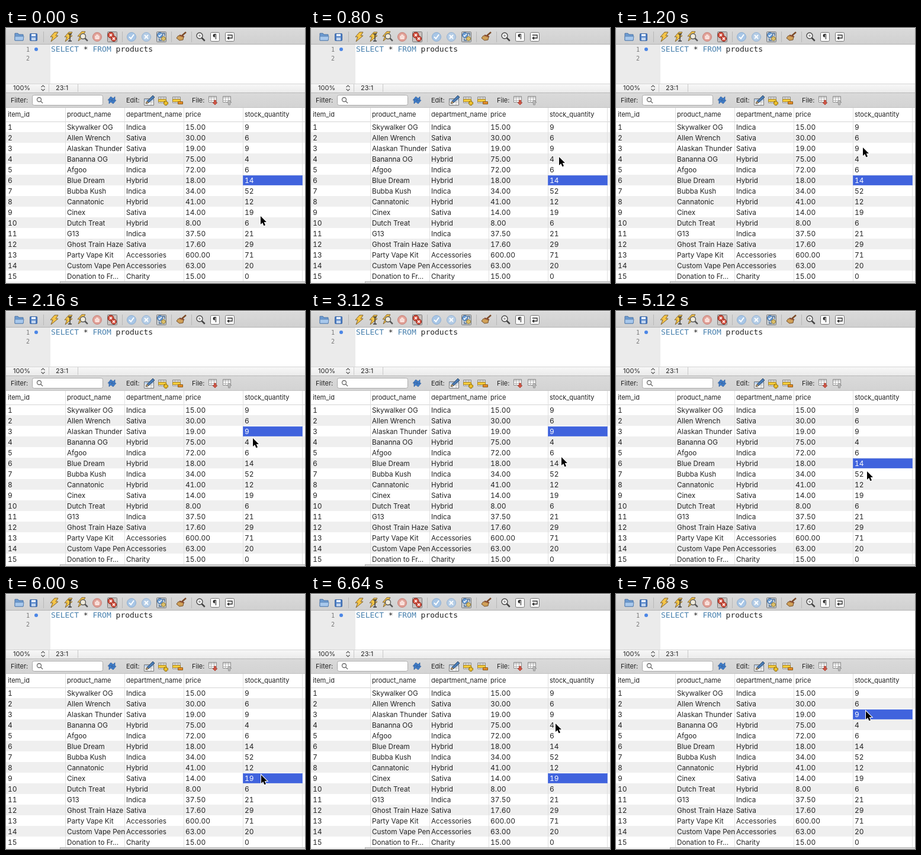
These frames come from a looping animation (505 by 431 pixels, 8000 ms). An HTML page with a canvas:

```html
<!DOCTYPE html>
<html lang="en">
<head>
<meta charset="utf-8">
<title>Query results</title>
<style>
  html, body { margin: 0; width: 100%; height: 100%; overflow: hidden; background: #fff; }
  canvas, svg { position: absolute; left: 0; top: 0; display: block; }
  text { font-family: Inter, "Open Sans", sans-serif; font-size: 11px; fill: #222; white-space: pre; }
  .code { font: 13px "DejaVu Sans Mono", monospace; }
  .line { font: 10px "DejaVu Sans Mono", monospace; fill: #777; }
  .keyword { fill: #467fad; }
  .name { font-size: 11.7px; }
  .number { font-size: 12px; font-variant-numeric: tabular-nums; }
  .active { fill: #fff; }
</style>
</head>
<body>
<canvas id="chrome" width="505" height="431"></canvas>
<svg id="overlay" width="505" height="431">
  <rect id="selection" x="400.5" width="100" height="16" fill="#4063dd" stroke="#5c7be2"/>
  <g id="labels"></g>
  <path id="pointer" d="M0 0V14L3.2 11L5.5 16.3L8 15.2L5.7 10H10Z"
        stroke="#fff" stroke-width="2" paint-order="stroke"/>
</svg>
<script>
const $ = id => document.getElementById(id);
const ctx = $('chrome').getContext('2d');
const LOOP = 8000, STEP = 80;
const ROW_TOP = 158, ROW_H = 18, COL_W = 100;

const columns = ['item_id', 'product_name', 'department_name', 'price', 'stock_quantity'];
const rows = `Skywalker OG|Indica|15.00|9
Allen Wrench|Sativa|30.00|6
Alaskan Thunder|Sativa|19.00|9
Bananna OG|Hybrid|75.00|4
Afgoo|Indica|72.00|6
Blue Dream|Hybrid|18.00|14
Bubba Kush|Indica|34.00|52
Cannatonic|Hybrid|41.00|12
Cinex|Sativa|14.00|19
Dutch Treat|Hybrid|8.00|6
G13|Indica|37.50|21
Ghost Train Haze|Sativa|17.60|29
Party Vape Kit|Accessories|600.00|71
Custom Vape Pen|Accessories|63.00|20
Donation to Fr...|Charity|15.00|0`.split('\n').map((line, i) => [String(i + 1), ...line.split('|')]);

// [time, selected row]
const selections = [[0, 6], [1680, 3], [4080, 6], [6000, 9], [7680, 3]];

// [time, x, y] of the pointer tip
const pointerKeys = [
  [0, 430, 318], [400, 427, 309], [560, 427, 309], [800, 419, 218], [960, 418, 205],
  [1200, 417, 202], [2080, 417, 202], [2160, 417, 215], [2960, 422, 242], [3120, 423, 247],
  [3360, 423, 254], [4000, 423, 254], [4080, 424, 253], [5040, 424, 253], [5120, 424, 271],
  [5360, 429, 300], [5600, 431, 306], [6320, 431, 306], [6640, 413, 219], [6800, 418, 203],
  [6960, 420, 199], [7040, 420, 199], [7120, 422, 198], [LOOP, 422, 198]
];

function rect(x, y, w, h, color) {
  ctx.fillStyle = color;
  ctx.fillRect(x, y, w, h);
}

function text(str, x, y, className = '') {
  const node = document.createElementNS('http://www.w3.org/2000/svg', 'text');
  node.setAttribute('x', x);
  node.setAttribute('y', y);
  node.setAttribute('class', className);
  node.textContent = str;
  $('labels').append(node);
  return node;
}

// Fills and/or strokes an SVG path placed at (x, y).
function shape(x, y, d, fill, stroke, width = 1) {
  const path = new Path2D(d);
  ctx.save();
  ctx.translate(x, y);
  if (fill) { ctx.fillStyle = fill; ctx.fill(path); }
  if (stroke) { ctx.strokeStyle = stroke; ctx.lineWidth = width; ctx.stroke(path); }
  ctx.restore();
}

function disc(x, y, r, fill, stroke, width = 1) {
  shape(x, y, `M${r} 0A${r} ${r} 0 1 1 ${-r} 0A${r} ${r} 0 1 1 ${r} 0Z`, fill, stroke, width);
}

function box(x, y, w, h, r, fill, stroke) {
  ctx.beginPath();
  ctx.roundRect(x + .5, y + .5, w - 1, h - 1, r);
  ctx.fillStyle = fill;
  ctx.fill();
  ctx.strokeStyle = stroke;
  ctx.lineWidth = 1;
  ctx.stroke();
}

function verticalGradient(y0, y1, from, to) {
  const g = ctx.createLinearGradient(0, y0, 0, y1);
  g.addColorStop(0, from);
  g.addColorStop(1, to);
  return g;
}

function bolt(x, y) {
  shape(x, y, 'M1-8H7L3-2H7L-5 8L-2 0H-6Z', '#f6c548', '#80622c');
}

function magnifier(x, y, r, color, fill = '#fff') {
  shape(x, y, `M${r * .7} ${r * .7}L${r * 1.75} ${r * 1.75}`, null, color, r > 4 ? 2.5 : 1.4);
  disc(x, y, r, fill, color, 1.3);
}

function gridIcon(x, y, head = '#d5d5d5') {
  box(x - 8, y - 6, 14, 11, 0, '#fafafa', '#8d8d8d');
  rect(x - 7, y - 5, 12, 3, head);
  shape(x, y, 'M-8 1.5H6M-3.5-5V5M1.5-5V5', null, '#a5a5a5', .8);
}

function drawToolbar() {
  rect(0, 0, 505, 28, verticalGradient(0, 28, '#dadada', '#d0d0d0'));
  rect(0, 0, 505, 1, '#f0f0f0');
  rect(0, 27, 505, 1, '#b4b4b4');
  for (const x of [63, 196, 279, 313]) rect(x, 6, 1, 18, '#b8b8b8');

  shape(22, 15, 'M-7-6H-2L0-4H7V6H-7Z', '#6d9bd1', '#4a73a4');
  shape(22, 15, 'M-7-1H8L7 6H-7Z', '#a8c8ec', '#5a83b4');
  box(40, 9, 13, 13, 1, '#4f7fc4', '#345f9e');
  rect(43, 10, 7, 4, '#e7effa');
  rect(43, 16, 7, 5, '#c1d4ed');

  bolt(81, 15);
  bolt(105, 15);
  shape(108, 16, 'M-3-6H3M0-6V6M-3 6H3', null, '#333', 1.4);
  bolt(127, 14);
  magnifier(130, 14, 4.5, '#555', '#f0ebdc');
  disc(154, 15, 7.5, '#e0a097', '#c98178');
  shape(154, 15, 'M-3 3V-2M-1 3V-4M1 3V-4M3 3V-2M-3 3H3', null, '#fff1ed', 1.5);
  box(171, 6, 17, 18, 1, '#c9c2bf', '#777');
  disc(177, 12, 5, '#d44a38', '#8b3026');
  disc(182, 18, 4.5, '#d44a38', '#8b3026');
  shape(177, 12, 'M-2-2L2 2M2-2L-2 2M3 4L7 8M7 4L3 8', null, '#fff', 1.4);

  disc(212, 15, 7.5, '#a8c6e6', '#8caed3');
  shape(212, 15, 'M-4 0L-1 3L4-4', null, '#fff', 2);
  disc(237, 15, 7.5, '#b5cde6', '#94b2d3');
  shape(237, 15, 'M-3-3L3 3M3-3L-3 3', null, '#fff', 2);
  box(254, 6, 17, 18, 1, '#c4cbd2', '#777');
  disc(260, 12, 4.5, '#6c9dd3', '#3f6b9f');
  shape(260, 12, 'M-2 0L-1 2L3-2', null, '#fff', 1.4);
  disc(266, 18, 3.5, '#dcc06a', '#8d7638');
  shape(264, 10, 'M0-1H4V3M-5 8V11H-1', null, '#4a6b91', 1.3);

  shape(296, 14, 'M8-7L1-1', null, '#7b4a27', 2.5);
  shape(296, 14, 'M-5-1L4 0L3 6L-3 7L-8 3Z', '#d0a058', '#75502b');
  shape(296, 14, 'M-3-2L5 1', null, '#8a4b30', 2);
  magnifier(327, 13, 5, '#444', '#f4f4f4');
  disc(327, 13, 1.8, '#999');

  box(345, 7, 16, 16, 2, '#fafafa', '#777');
  text('¶', 349, 19, 'name');
  box(370, 7, 16, 16, 2, '#fafafa', '#777');
  shape(378, 15, 'M-4-3H4V2H-2', null, '#333', 1.4);
  shape(378, 15, 'M-5 2L-1-1V5Z', '#333');
}

function drawEditor() {
  rect(0, 28, 505, 67, '#fff');
  rect(0, 28, 75, 67, '#ebebeb');
  text('1', 34, 40, 'line');
  text('2', 34, 55, 'line');
  disc(51, 36, 3, '#4b86e6');
  const charW = 7.826;
  text('SELECT', 76, 40, 'code keyword');
  text('*', 76 + 7 * charW, 40, 'code');
  text('FROM', 76 + 9 * charW, 40, 'code keyword');
  text('products', 76 + 14 * charW, 40, 'code');

  rect(0, 94, 505, 15, verticalGradient(94, 109, '#f8f8f8', '#ebebeb'));
  rect(0, 94, 505, 1, '#d4d4d4');
  text('100%', 12, 105);
  shape(62.5, 101.5, 'M-3-1.5L0-4.5L3-1.5M-3 1.5L0 4.5L3 1.5', null, '#555', 1.1);
  text('23:1', 84, 105);
  rect(72, 95, 1, 13, '#c8c8c8');
  rect(121, 95, 1, 13, '#c8c8c8');
}

function drawFilterBar() {
  rect(0, 109, 505, 26, verticalGradient(109, 135, '#dadada', '#d3d3d3'));
  rect(0, 109, 505, 1, '#b9b9b9');
  rect(0, 134, 505, 1, '#c4c4c4');
  text('Filter:', 8, 126);
  box(44, 113, 120, 18, 3, '#fff', '#aaa');
  magnifier(56, 121, 3.5, '#666');

  shape(179, 122, 'M-7 0L-2-6L2-3L5-6V1H-1L1-1L-2-2L-4 0Z', '#3f7cc8', '#2c5c9d', .7);
  shape(179, 122, 'M7 0L2 6L-2 3L-5 6V-1H1L-1 1L2 2L4 0Z', '#3f7cc8', '#2c5c9d', .7);

  text('Edit:', 203, 126);
  box(233, 119, 17, 12, 0, '#fafafa', '#777');
  rect(234, 120, 15, 3, '#b5cde9');
  shape(242, 125, 'M-8 0H8M-3-5V5M3-5V5', null, '#a5a5a5', .8);
  shape(242, 122, 'M-6 6L-4 2L6-8L9-5L-1 4Z', '#4b7db6', '#2e4969');
  shape(242, 122, 'M-6 6L-4 2L-1 4Z', '#e9c58c', '#604b30', .7);
  for (const x of [265, 289]) {
    gridIcon(x, 122);
    box(x - 8, 120, 14, 5, 0, '#f5cd3c', '#a98420');
  }
  shape(270, 127, 'M-4 0H4M0-4V4', null, '#8a6a12', 4);
  shape(270, 127, 'M-3.3 0H3.3M0-3.3V3.3', null, '#f3c52f', 2.4);
  box(290, 124, 9, 5, 0, '#e88f2d', '#8a5a12');

  text('File:', 314, 126);
  gridIcon(350, 121);
  shape(353, 126, 'M-1.5-4H1.5V0H4L0 4L-4 0H-1.5Z', '#d25746', '#a83a2d', .8);
  gridIcon(374, 121);
  shape(377, 126, 'M-1.5 4H1.5V0H4L0-4L-4 0H-1.5Z', '#bcbcbc', '#888', .8);
}

// Draws the grid and returns the stock cells, one per row.
function drawTable() {
  rect(0, 135, 505, 296, '#fff');
  columns.forEach((name, c) => text(name, c * COL_W + 3, 150));
  rows.forEach((_, r) => {
    if (r % 2) rect(0, ROW_TOP + r * ROW_H, 505, ROW_H, '#efefef');
  });
  rect(0, ROW_TOP, 505, 1, '#d4d4d4');
  for (let c = 1; c <= 5; c++) rect(c * COL_W, 135, 1, 293, '#dfdfdf');

  rect(0, 428, 505, 3, '#d9d9d9');
  rect(91, 428, 414, 1, '#b8b8b8');
  rect(0, 428, 91, 3, '#f6f6f6');
  rect(91, 428, 1, 3, '#b0b0b0');

  return rows.map((cells, r) => cells.map((value, c) =>
    text(value, c * COL_W + 3, ROW_TOP + r * ROW_H + 14, c === 1 || c === 2 ? 'name' : 'number')
  ).pop());
}

function pointerAt(t) {
  const next = pointerKeys.findIndex(key => key[0] > t);
  const [t0, x0, y0] = pointerKeys[next - 1];
  const [t1, x1, y1] = pointerKeys[next];
  const k = (t - t0) / (t1 - t0);
  return [Math.round(x0 + (x1 - x0) * k), Math.round(y0 + (y1 - y0) * k)];
}

drawToolbar();
drawEditor();
drawFilterBar();
const stockCells = drawTable();

function render(now) {
  const t = Math.floor(now % LOOP / STEP) * STEP;
  const selected = selections.filter(([start]) => start <= t).pop()[1] - 1;
  $('selection').setAttribute('y', ROW_TOP + selected * ROW_H + 1.5);
  stockCells.forEach((cell, r) => cell.classList.toggle('active', r === selected));
  $('pointer').setAttribute('transform', `translate(${pointerAt(t)})`);
  requestAnimationFrame(render);
}
render(performance.now());
</script>
</body>
</html>
```
